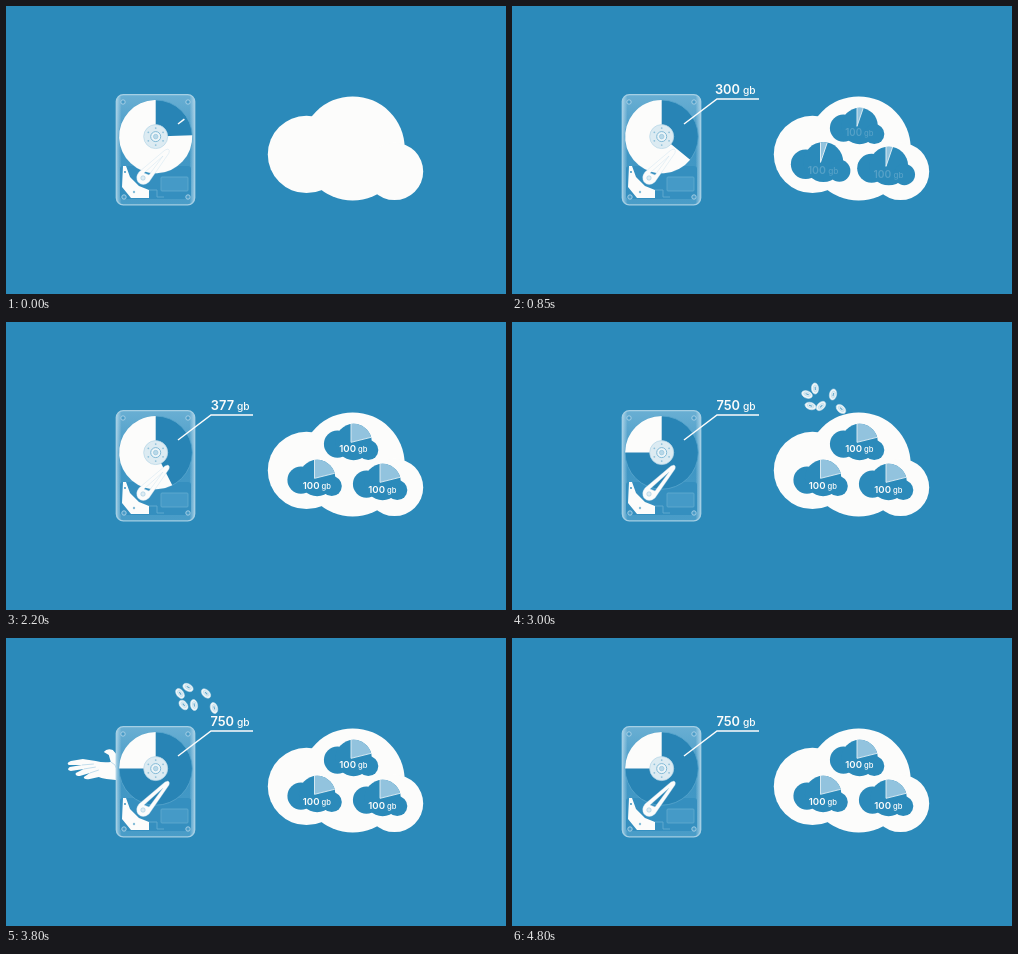
Recreate the animation shown at these times as an HTML page with a canvas. Size 500 by 288 pixels, loop 5.1 s.

```html
<!DOCTYPE html>
<html lang="en">
<head>
<meta charset="utf-8">
<title>Shared storage</title>
<style>
  html, body { margin: 0; width: 100%; height: 100%; overflow: hidden; background: #2b8aba; }
  canvas { display: block; width: 500px; height: 288px; }
</style>
</head>
<body>
<canvas id="stage" width="500" height="288"></canvas>
<script>
const ctx = document.getElementById('stage').getContext('2d');
const LOOP = 5100, STEP = 50;
const BLUE = '#2b8aba', WHITE = '#fcfcfb', PALE = '#a8d0e5';
const FONT = 'Inter, "Open Sans", sans-serif';
const DISC = { x: 149.7, y: 130.6, r: 36.6 };

const clamp = v => Math.max(0, Math.min(1, v));
const span = (t, a, b) => clamp((t - a) / (b - a));
const mix = (a, b, k) => a + (b - a) * k;
const easeOut = k => 1 - (1 - k) ** 2;
const easeInOut = k => k < .5 ? 2 * k * k : 1 - 2 * (1 - k) ** 2;
const easeBack = k => 1 + 2.7 * (k - 1) ** 3 + 1.7 * (k - 1) ** 2;
const rad = deg => deg * Math.PI / 180;

function at(x, y, draw) {
  ctx.save();
  ctx.translate(x, y);
  draw();
  ctx.restore();
}

function paint(path, fill, stroke, width = 1) {
  if (fill) { ctx.fillStyle = fill; ctx.fill(path, 'evenodd'); }
  if (stroke) { ctx.strokeStyle = stroke; ctx.lineWidth = width; ctx.stroke(path); }
}

function circle(x, y, r) {
  const p = new Path2D();
  p.arc(x, y, r, 0, Math.PI * 2);
  return p;
}

function box(x, y, w, h, r) {
  const p = new Path2D();
  p.roundRect(x, y, w, h, r);
  return p;
}

function gradient(x0, y0, x1, y1, stops) {
  const g = ctx.createLinearGradient(x0, y0, x1, y1);
  stops.forEach(([offset, color]) => g.addColorStop(offset, color));
  return g;
}

// Sector with angles in degrees, clockwise from the top.
function sector(x, y, r, from, to) {
  const p = new Path2D();
  p.moveTo(x, y);
  p.arc(x, y, r, rad(from - 90), rad(to - 90));
  p.closePath();
  return p;
}

// Number right-aligned at x, followed by a smaller unit.
function amount(value, x, y, size, unitSize, gap) {
  ctx.fillStyle = WHITE;
  ctx.textAlign = 'right';
  ctx.font = `600 ${size}px ${FONT}`;
  ctx.fillText(value, x, y);
  ctx.textAlign = 'left';
  ctx.font = `500 ${unitSize}px ${FONT}`;
  ctx.fillText('gb', x + gap, y);
}

// Cloud outline centred on its own bounding box.
const lobes = [[-38.7, 6, 38.7], [7.5, 0, 52], [49.3, 23, 28.7]].map(l => circle(...l));
const cloud = new Path2D();
lobes.forEach(lobe => cloud.addPath(lobe));

const shares = [
  { x: 345, y: 120, start: 480, textY: 10 },
  { x: 308.5, y: 156, start: 650, textY: 11 },
  { x: 374, y: 160, start: 680, textY: 11 }
];

function drawShare(s, t) {
  const scale = easeBack(span(t, s.start, s.start + 380));
  if (scale <= 0) return;
  const angle = 76 * easeOut(span(t, 720, 1700));
  at(s.x, s.y, () => {
    ctx.scale(scale, scale);
    ctx.save();
    ctx.scale(.35, .35);
    lobes.forEach(lobe => paint(lobe, BLUE));
    ctx.clip(cloud);
    if (angle) paint(sector(0, 1, 68, 0, angle), '#92c3de', '#e4f0f6', 2.5);
    ctx.restore();
    ctx.globalAlpha = span(t, 760, 1200);
    amount('100', 5, s.textY, 9.6, 7.6, 2);
  });
}

function drawCloud(t) {
  at(339.2, 142.4, () => lobes.forEach(lobe => paint(lobe, WHITE)));
  shares.forEach(s => drawShare(s, t));
}

const plate = new Path2D('M117 160 L120 160 L124 171 L133 180 L143 184 V192 H125 L116 181 Z');
// The arm is hollow, so the disc shows through its slit.
const arm = new Path2D(`M162 143 Q164 144 163 147 L143 176 Q137 181 132 176
  Q129 171 133 166 L159 144 Z M157 150 L143 169 L138 167 Z`);

function drawDrive(angle) {
  const body = box(110.3, 88.6, 78.4, 110.2, 7);
  paint(body, gradient(0, 88, 0, 199, [[0, '#6aafd3'], [.5, '#3f96c4'], [1, '#4a9dc8']]));
  const glass = 'rgba(225,240,248,';
  paint(body, gradient(110, 0, 189, 0, [
    [0, glass + '.6)'], [.07, glass + '0)'], [.93, glass + '0)'], [1, glass + '.6)']
  ]), '#a5cfe4', 1.3);
  paint(box(114, 160, 71, 33, 3), '#358fbf');

  const { x, y, r } = DISC;
  paint(circle(x, y, r), '#2884b5', '#5aa6cd', .8);
  paint(sector(x, y, r, angle, 360), WHITE);

  for (const [sx, sy] of [[117, 96], [182, 96], [118, 191], [182, 191]])
    paint(circle(sx, sy, 2.2), '#4a9cc8', '#add3e7', .9);

  paint(circle(x, y, 12), '#dcebf2', '#b5d6e7', .7);
  for (let i = 0; i < 6; i++) {
    const a = rad(i * 60 + 30);
    paint(circle(x + 8.5 * Math.cos(a), y + 8.5 * Math.sin(a), .9), '#90c2db');
  }
  paint(circle(x, y, 5), '#edf5f8', '#78b4d3', .9);
  paint(circle(x, y, 2.3), '#b8d8e8', '#8dc0da', .6);

  paint(box(155, 171, 27, 14, 1), '#459ac7', '#62abd0', .8);
  paint(new Path2D('M143 184 H151 V191 H158'), null, '#62abd0', .9);
  paint(plate, WHITE);
  paint(circle(119, 166, .9), BLUE);
  paint(circle(128, 186, 1.2), '#86bdd9');
  paint(arm, WHITE, '#c5dfec', .4);
  paint(circle(137, 172, 2.2), '#deecf3', '#a0cbe0', .6);
}

function drawLabel(t, value) {
  const reach = mix(8, 84, easeOut(span(t, 0, 400)));
  ctx.save();
  ctx.setLineDash([reach, 200]);
  paint(new Path2D('M172 118 L205 93 H247'), null, WHITE, 1.5);
  ctx.restore();
  ctx.save();
  ctx.globalAlpha = span(t, 150, 400);
  amount(Math.round(value), 228, 88, 12.8, 10.2, 3);
  ctx.restore();
}

// Time, x, y of the middle of the coin swarm.
const flight = [
  [2750, 342, 118], [3000, 309, 77], [3450, 244, 63],
  [3800, 188, 60], [4150, 131, 76], [4380, 74, 117]
];
// Offset from the middle and tilt of each coin.
const coins = [
  [-6, -10.5, -35], [-14, -4.5, -50], [12, -4.5, -20],
  [-10.5, 7, -55], [0, 7, 15], [20, 10, -30]
];

function flightPoint(t) {
  let i = 0;
  while (i < flight.length - 2 && t > flight[i + 1][0]) i++;
  const point = n => flight[Math.max(0, Math.min(flight.length - 1, n))];
  const [a, b, c, d] = [i - 1, i, i + 1, i + 2].map(point);
  const u = (t - b[0]) / (c[0] - b[0]);
  return [1, 2].map(n => b[n] + .5 * u * (c[n] - a[n]
    + u * (2 * a[n] - 5 * b[n] + 4 * c[n] - d[n]
    + u * (3 * (b[n] - c[n]) + d[n] - a[n]))));
}

function handShift(t) {
  return 82 * (t < 4230
    ? 1 - easeOut(span(t, 3560, 4180))
    : easeInOut(span(t, 4230, 4780)));
}

function drawCoins(t) {
  if (t < 2750 || t >= 4780) return;
  const [x, y] = t > 4380 ? [62 + handShift(t), 117] : flightPoint(t);
  const spread = mix(1, .45, span(t, 4180, 4380));
  const turn = Math.min(t, 4380) - 3450;
  coins.forEach(([dx, dy, tilt], i) => at(x + dx * spread, y + dy * spread, () => {
    ctx.rotate(rad(tilt + turn * (i % 2 ? .04 : -.07)));
    const rim = new Path2D(), face = new Path2D();
    rim.ellipse(0, 0, 3.6, 5.6, 0, 0, 7);
    face.ellipse(.3, 0, 2, 3.6, 0, 0, 7);
    paint(rim, '#f1f7f9', '#cfe4ee', .5);
    paint(face, '#dcebf2', '#b4d6e7', .5);
    paint(new Path2D('M.3 -1.6 V1.6'), null, '#5ba6cc', 1);
  }));
}

const hand = new Path2D(`M112 158 V136 C100 131 88 128 82 119 L76 112
  Q70 110 67 114 L72 117 L74 124 Q66 125 59 123 L46 121 L34 123
  Q29 125 32 127 L45 127 L33 129 Q29 132 34 133 L47 131 L39 135
  Q38 138 43 138 L53 135 L47 139 Q47 142 53 141 L62 139
  C72 143 80 140 88 145 C95 152 103 157 112 158 Z`);
const creases = new Path2D('M45 127 L57 126 M47 131 L59 129 M53 135 L62 132 M74 124 Q79 126 80 131');

function drawHand(t) {
  if (t < 3560 || t >= 4780) return;
  ctx.save();
  ctx.beginPath();
  ctx.rect(0, 0, 112, 288);
  ctx.clip();
  ctx.translate(handShift(t), 0);
  paint(hand, WHITE);
  paint(creases, null, PALE, .7);
  ctx.restore();
}

function draw(t) {
  const fill = easeOut(span(t, 0, 450));
  const grow = easeInOut(span(t, 1950, 2805));
  const angle = mix(mix(88, 129, fill), 270, grow);
  const value = mix(mix(208, 300, fill), 750, grow);
  ctx.fillStyle = BLUE;
  ctx.fillRect(0, 0, 500, 288);
  drawHand(t);
  drawCoins(t);
  drawDrive(angle);
  drawCloud(t);
  drawLabel(t, value);
}

const begin = performance.now();
function tick() {
  const t = (performance.now() - begin) % LOOP;
  draw(Math.floor(t / STEP) * STEP);
  requestAnimationFrame(tick);
}
tick();
</script>
</body>
</html>
```
